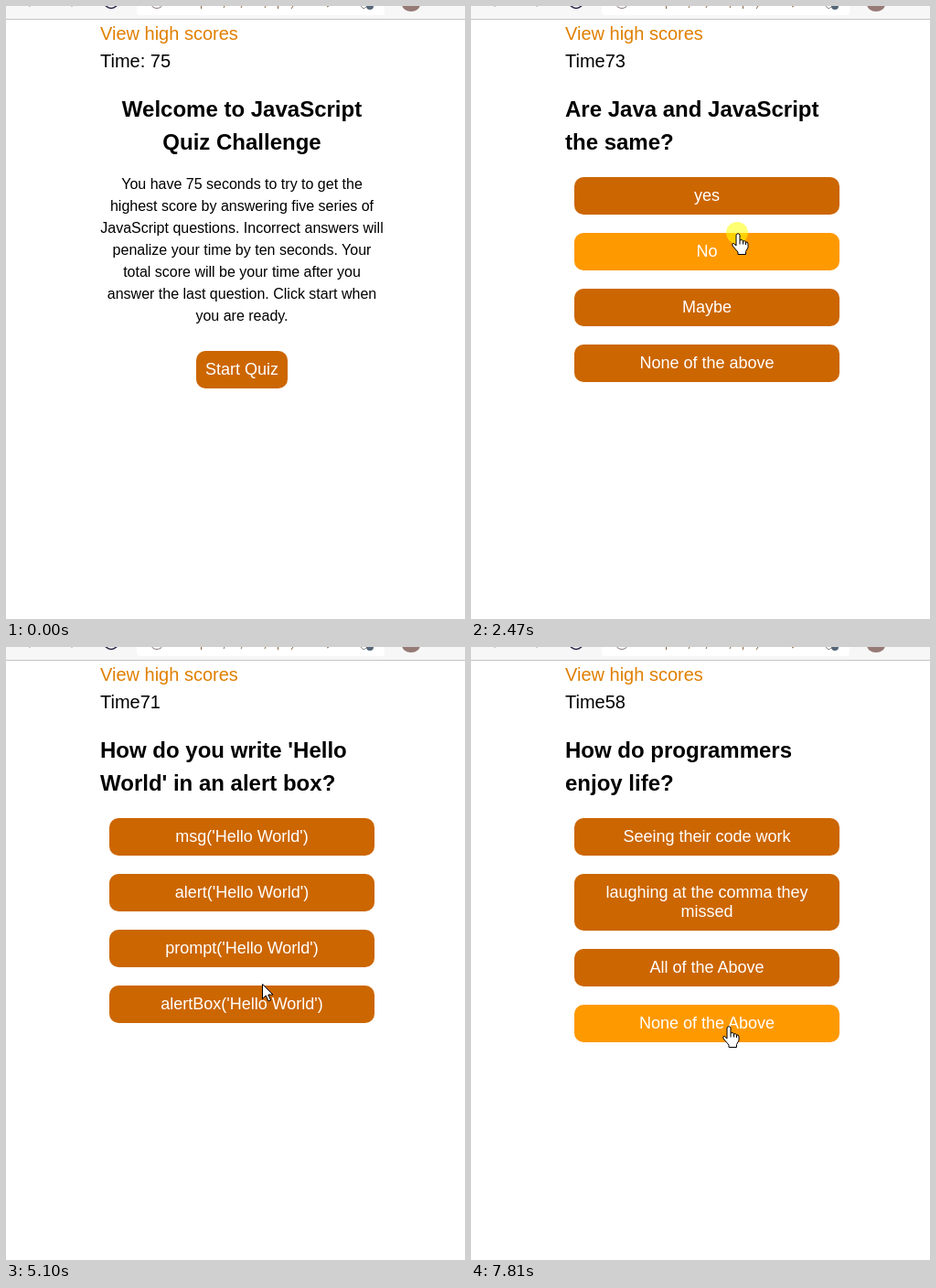
Write an HTML page that moves like this. It is 502x670 px and loops after 8 s.

```html
<!DOCTYPE html>
<html lang="en">
<head>
<meta charset="utf-8">
<title>Quiz</title>
<style>
html, body { margin: 0; width: 100%; height: 100%; overflow: hidden; background: #fff; }
body { position: relative; font: 20px/30px "Liberation Sans", Arial, sans-serif; color: #000; }
svg { position: absolute; left: 0; top: 0; }
main { position: absolute; left: 103px; top: 15px; width: 310px; white-space: nowrap; }
a { display: block; color: #e07f00; }
#time { height: 30px; }
h2 { margin: 20px 0; font-size: 24px; line-height: 36px; }
p { margin: -4px 0 26px; font-size: 16px; line-height: 24px; }
.center { text-align: center; }
.options { display: flex; flex-direction: column; gap: 20px; margin: 0 10px 30px; }
.btn { padding: 10px; border-radius: 10px; background: #c60; color: #fff;
  font-size: 18px; line-height: 21px; text-align: center; }
.small { display: inline-block; vertical-align: top; }
.hover { background: #f90; }
.off { background: #a9a9a9; }
.right { background: #6b8e23; }
.result { border-top: 1px solid #a9a9a9; margin-bottom: 30px; color: #a9a9a9;
  font: italic bold 24px/36px "Liberation Sans", Arial, sans-serif; }
</style>
</head>
<body>
<svg width="502" height="16" fill="none">
  <path fill="#f7f7f7" d="M0 0H502V14H0Z"/>
  <path stroke="#c4c4c4" d="M0 14.5H502"/>
  <rect x="143" y="-20" width="271" height="30" rx="4" fill="#fff"/>
  <circle cx="115" cy="-5" r="7.5" stroke="#224" stroke-width="1.6"/>
  <circle cx="165" cy="-5" r="7.5" stroke="#877"/>
  <path stroke="#a98" d="M26 0v1M72 0v1"/>
  <path stroke="#864" d="M213.500 0v3M239 0l-1 2M258 0l-1 2M284 0l-1 2M297.500 0v3M314 0l-2 3M353 0l-2 1"/>
  <path stroke="#888" d="M388 0l3 3 3-2"/>
  <circle cx="398" cy="0" r="4" fill="#567"/>
  <ellipse cx="443" cy="-2" rx="10" ry="8" fill="#967a76"/>
</svg>
<main>
  <a>View high scores</a>
  <div id="time"></div>
  <div id="view"></div>
</main>
<svg width="502" height="670">
  <g id="pointer" fill="#fff" stroke="#000" stroke-linejoin="round">
    <circle id="ring" r="12" fill="#ff0" fill-opacity=".55" stroke="none"/>
    <path id="arrow" d="M.5 .5V16.500L4.200 13L7 19L9.500 18L6.800 12H12Z"/>
    <path id="hand" d="M-1 2Q1 -1 3 2V8Q6 6.500 6.500 9Q9 8 9.500 10Q12 9.500 12 12V16L9.500 20.500V23.500H1V21L-5 14Q-6 11 -3.500 11.500L-1 14ZM3 8V12.500M6.500 9V12.500M9.500 10V13"/>
  </g>
</svg>
<script>
const LOOP = 8000;
const $ = id => document.getElementById(id);

const questions = [
  { title: 'Are Java and JavaScript<br>the same?',
    options: ['yes', 'No', 'Maybe', 'None of the above'],
    result: 'You got it right!' },
  { title: "How do you write 'Hello<br>World' in an alert box?",
    options: ['msg', 'alert', 'prompt', 'alertBox'].map(f => f + "('Hello World')"),
    result: 'Sorry that was not the<br>correct answer.' },
  { title: 'How do programmers<br>enjoy life?',
    options: ['Seeing their code work', 'laughing at the comma they<br>missed',
      'All of the Above', 'None of the Above'] }
];

const button = (text, cls) => `<div class="btn ${cls}">${text}</div>`;

const welcome = `<div class="center"><h2>Welcome to JavaScript<br>Quiz Challenge</h2>
  <p>You have 75 seconds to try to get the<br>highest score by answering five series of<br>
  JavaScript questions. Incorrect answers will<br>penalize your time by ten seconds. Your<br>
  total score will be your time after you<br>answer the last question. Click start when<br>
  you are ready.</p>${button('Start Quiz', 'small live')}</div>`;

// The second option is the correct one in every answered question.
function ask({ title, options, result }, answered) {
  const list = options.map((o, i) => button(o, !answered ? 'live' : i === 1 ? 'right' : 'off'));
  return `<h2>${title}</h2><div class="options">${list.join('')}</div>` + (answered
    ? `<div class="center"><div class="result">${result}</div>${button('Next', 'small live')}</div>` : '');
}

const views = [
  [0, welcome],
  [1460, ask(questions[0])], [2620, ask(questions[0], true)],
  [3950, ask(questions[1])], [5590, ask(questions[1], true)],
  [6940, ask(questions[2])]
];
const clock = [
  [0, 'Time: 75'], [1460, 'Time74'], [2470, 'Time73'], [3490, 'Time72'],
  [4490, 'Time71'], [5460, 'Time70'], [6470, 'Time59'], [7470, 'Time58']
];
const clicks = [[1260, 1460], [2400, 2620], [3690, 3950], [5390, 5590], [6740, 6940]];

// Pointer moves: first step, last step, number of steps, end x, end y
const moves = [
  [260, 660, 6, 304, 427], [990, 1060, 2, 267, 400], [1860, 2140, 5, 291, 248],
  [3020, 3490, 8, 255, 517], [4280, 4420, 3, 273, 412], [4490, 4490, 1, 279, 364],
  [4560, 4560, 1, 280, 352], [4760, 4830, 2, 280, 358], [5100, 5100, 1, 280, 368],
  [5170, 5170, 1, 280, 377], [6120, 6120, 1, 265, 453], [6190, 6540, 6, 258, 548],
  [7470, 7670, 4, 281, 414]
];
const lateHand = [7670, 7810];

const within = (t, [a, b]) => t >= a && t < b;
const current = (list, t) => list.filter(([start]) => t >= start).pop()[1];

function pointerAt(t) {
  let x = 438, y = 680;
  for (const [start, end, n, toX, toY] of moves) {
    if (t < start) break;
    const step = t >= end ? n : 1 + Math.floor((t - start) * (n - 1) / (end - start) + 0.1);
    const f = (1 - Math.cos(Math.PI * step / n)) / 2;
    x += (toX - x) * f;
    y += (toY - y) * f;
  }
  return [Math.round(x), Math.round(y)];
}

let shown;
function draw(t) {
  const view = current(views, t);
  if (view !== shown) $('view').innerHTML = shown = view;
  $('time').textContent = current(clock, t);

  const [x, y] = pointerAt(t);
  let over = false;
  for (const b of document.querySelectorAll('.live')) {
    const r = b.getBoundingClientRect();
    const hit = x >= r.left && x < r.right && y >= r.top && y < r.bottom;
    b.classList.toggle('hover', hit);
    over = over || hit;
  }
  const hand = over && !within(t, lateHand);
  $('pointer').setAttribute('transform', `translate(${x} ${y})`);
  $('hand').style.display = hand ? '' : 'none';
  $('arrow').style.display = hand ? 'none' : '';
  $('ring').style.display = clicks.some(c => within(t, c)) ? '' : 'none';
}

const begin = performance.now();
function frame() {
  draw((performance.now() - begin) % LOOP);
  requestAnimationFrame(frame);
}
frame();
</script>
</body>
</html>
```
